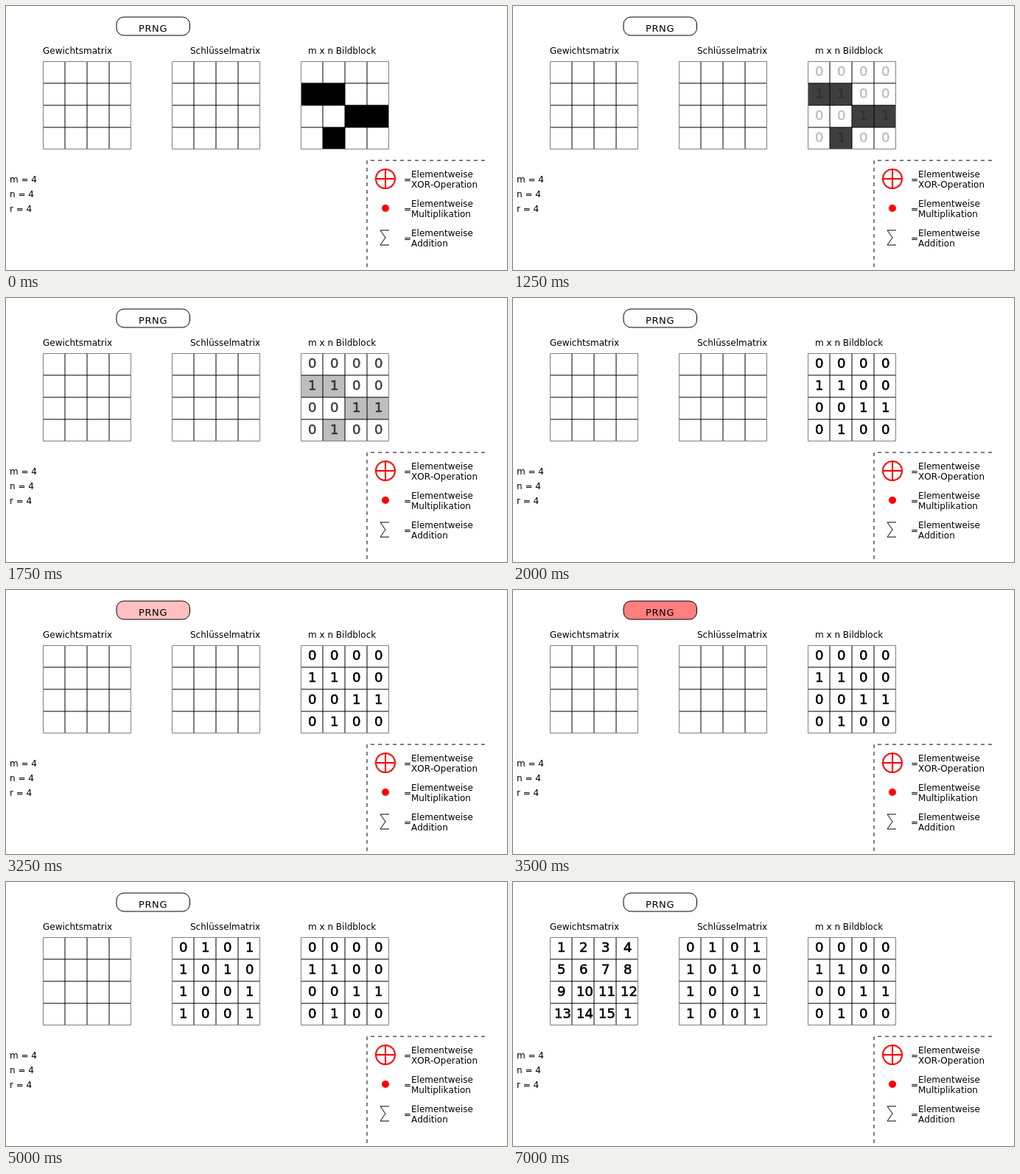
Write an HTML page that moves like this. It is 680 px wide and 359 px high and loops after 8000 ms.

```html
<!DOCTYPE html>
<html lang="de">
<head>
<meta charset="utf-8">
<title>Matrizen</title>
<style>
html, body { margin: 0; width: 100%; height: 100%; overflow: hidden; background: #fff; }
svg { display: block; }
text { font: 12px "DejaVu Sans", sans-serif; font-kerning: none; white-space: pre; }
.num text { font-size: 18px; stroke: #000; stroke-width: .6px; }
.gen { font-size: 13px; letter-spacing: .6px; }
</style>
</head>
<body>
<svg id="stage" width="680" height="359" viewBox="0 0 680 359"></svg>
<script>
const LOOP = 8000;
const CELL = 30, TOP = 75;
const stage = document.getElementById('stage');

function add(parent, tag, attrs = {}, text) {
  const el = document.createElementNS('http://www.w3.org/2000/svg', tag);
  for (const key in attrs) el.setAttribute(key, attrs[key]);
  if (text !== undefined) el.textContent = text;
  parent.append(el);
  return el;
}
const label = (x, y, text) => add(stage, 'text', { x, y }, text);
const line = (d, attrs) => add(stage, 'path', { d, fill: 'none', stroke: '#000', ...attrs });
const pillShape = attrs => add(stage, 'rect',
  { x: 150, y: 15, width: 99.5, height: 25, rx: 10, ...attrs });

function grid(x) {
  let d = '';
  for (let i = 1; i < 4; i++) {
    d += `M${x + i * CELL} ${TOP}v120M${x} ${TOP + i * CELL}h120`;
  }
  line(d);
  line(`M${x + .5} ${TOP + .5}h119v119h-119z`, { stroke: '#808080' });
}

function numbers(x, rows) {
  const g = add(stage, 'g', { class: 'num' });
  rows.forEach((row, r) => row.split(' ').forEach((n, c) =>
    add(g, 'text', { x: x + c * CELL + (n.length > 1 ? 6 : 10), y: TOP + r * CELL + 20 }, n)));
  return g;
}

// generator
const pill = pillShape({ fill: '#f00' });
pillShape({ fill: 'none', stroke: '#000' });
label(180, 35, 'PRNG').setAttribute('class', 'gen');

// matrices
label(50, 65, 'Gewichtsmatrix');
label(250, 65, 'Schlüsselmatrix');
label(410, 65, 'm x n Bildblock');

const bits = ['0 0 0 0', '1 1 0 0', '0 0 1 1', '0 1 0 0'];
const ink = add(stage, 'g');
bits.forEach((row, r) => row.split(' ').forEach((b, c) => {
  if (b === '1') {
    add(ink, 'rect', { x: 400 + c * CELL, y: TOP + r * CELL, width: CELL, height: CELL });
  }
}));
[50, 225, 400].forEach(grid);
const image = numbers(400, bits);
const key = numbers(225, ['0 1 0 1', '1 0 1 0', '1 0 0 1', '1 0 0 1']);
const weights = numbers(50, ['1 2 3 4', '5 6 7 8', '9 10 11 12', '13 14 15 1']);

['m', 'n', 'r'].forEach((v, i) => label(5, 240 + i * 20, v + ' = 4'));

// legend
line('M650 210H490V355', { 'stroke-dasharray': '5 5' });
line('M528 235a13 13 0 1 0 -26 0a13 13 0 1 0 26 0M502 235h26M515 222v26',
  { stroke: '#f00', 'stroke-width': 2 });
add(stage, 'circle', { cx: 515, cy: 275, r: 5, fill: '#f00' });
line('M520 305H508L515 315L508 325H520');
['XOR-Operation', 'Multiplikation', 'Addition'].forEach((op, i) => {
  const y = 233 + i * 40;
  label(540, y + 7, '=');
  label(550, y, 'Elementweise');
  label(550, y + 14, op);
});

// [time, opacity], each value held until the next
const fade = t => [[t, .25], [t + 250, .5], [t + 500, .75], [t + 750, 1]];
const tracks = [
  [image, [[0, 0], ...fade(1250)]],
  [ink, [[0, 1], ...fade(1250).map(([t, v]) => [t, 1 - v])]],
  [pill, [[0, 0], ...fade(3250), [5000, 0]]],
  [key, [[0, 0], [5000, 1]]],
  [weights, [[0, 0], [7000, 1]]]
];
const start = performance.now();

function draw(now) {
  const t = Math.max(0, now - start) % LOOP;
  for (const [el, steps] of tracks) {
    el.style.opacity = steps.findLast(([at]) => at <= t)[1];
  }
  requestAnimationFrame(draw);
}
draw(start);
</script>
</body>
</html>
```
